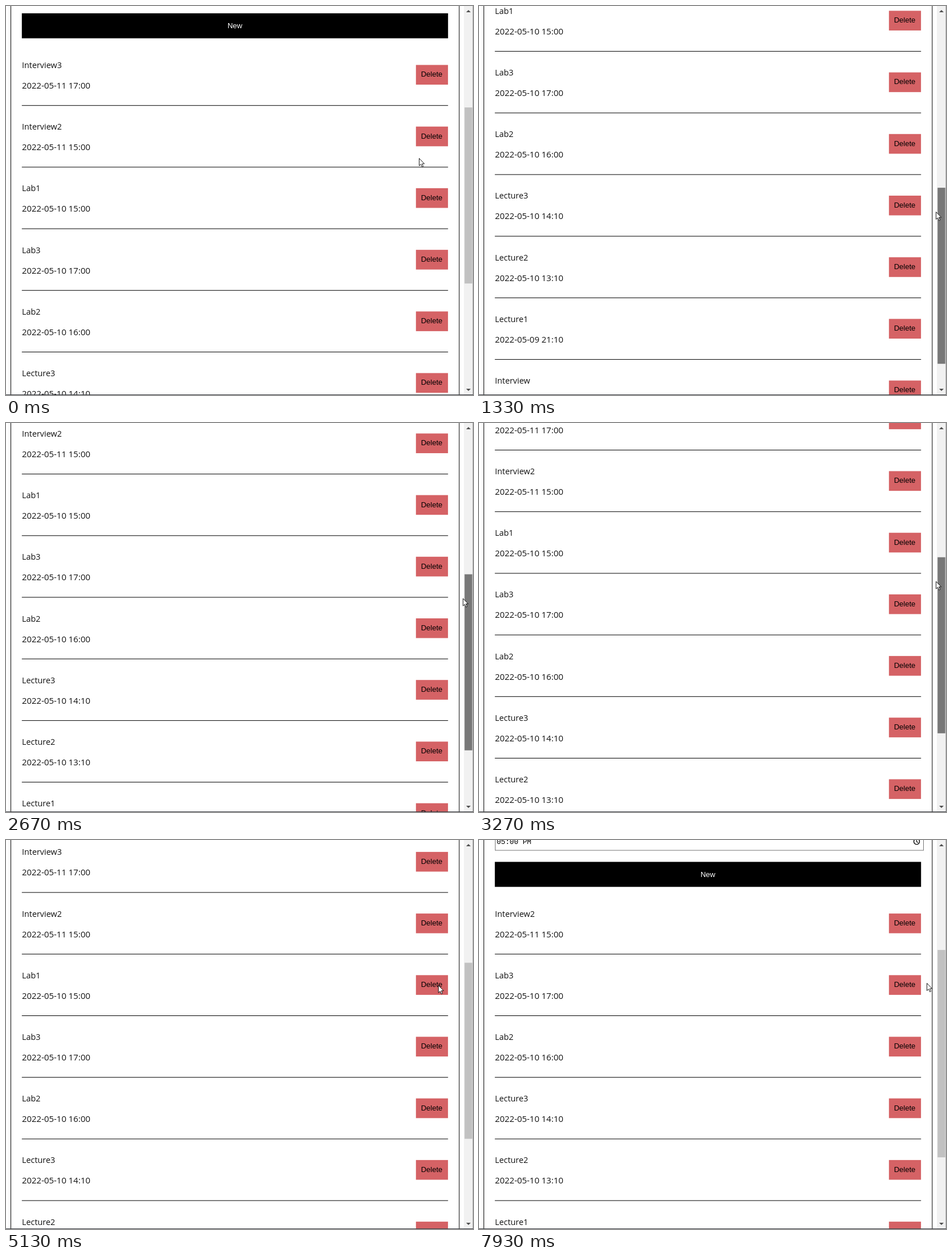
Animation, 820 px wide and 683 px high, one loop 8 s. Source, as an HTML page:

```html
<!DOCTYPE html>
<html lang="en">
<head>
<meta charset="utf-8">
<title>Schedule list</title>
<style>
  html, body { margin: 0; width: 100%; height: 100%; overflow: hidden; background: #fff; }
  svg { display: block; width: 820px; height: 683px; }
  .title, .date { font-family: "Open Sans", "Noto Sans", sans-serif; fill: #111; }
  .title { font-size: 14.4px; }
  .date { font-size: 14.95px; }
  .label { font: 13px "Liberation Sans", Arial, sans-serif; text-anchor: middle; }
  .time { font: 12.7px "Liberation Mono", monospace; white-space: pre; }
</style>
</head>
<body>
<svg id="stage" viewBox="0 0 820 683" xmlns="http://www.w3.org/2000/svg"></svg>
<script>
const W = 820, H = 683, LOOP = 8000, FPS = 15;
const PITCH = 108.2, PAGE = 1434, SCROLL = 356, FIRST = 174.2;
const TRACK = { top: 17, size: 649 };
const GRIP = { x: 802, y: 42 };
const DRAG = { from: 10, to: 72 };
const DELETE_LAB = 85, DELETE_TOP = 106;

const ROWS = [
  { name: "Interview3", date: "2022-05-11 17:00", gone: DELETE_TOP },
  { name: "Interview2", date: "2022-05-11 15:00" },
  { name: "Lab1", date: "2022-05-10 15:00", gone: DELETE_LAB },
  { name: "Lab3", date: "2022-05-10 17:00" },
  { name: "Lab2", date: "2022-05-10 16:00" },
  { name: "Lecture3", date: "2022-05-10 14:10" },
  { name: "Lecture2", date: "2022-05-10 13:10" },
  { name: "Lecture1", date: "2022-05-09 21:10" },
  { name: "Interview", date: "2022-05-09 20:00" }
];

// Strokes of the hand, in steps of 1/15 s. The first drag pulls past the page end.
const DRAGS = [
  { from: 12, to: 25, y: 438 },
  { from: 26, to: 40, y: 193.3 },
  { from: 40, to: 45, y: 150 },
  { from: 47, to: 50, y: 120 },
  { from: 58, to: 61, y: 22 },
  { from: 64, to: 68, y: 82.6 }
];
const REACH = { from: 0, to: 10, x: GRIP.x, y: 220 };
const MOVES = [
  { from: 72, to: 81, x: 745, y: 254 },
  { from: 89, to: 98, x: 742, y: 32 },
  { from: 110, to: 119, x: 786, y: 251 }
];

const stage = document.getElementById("stage");

function add(parent, tag, attrs, text) {
  const el = document.createElementNS("http://www.w3.org/2000/svg", tag);
  for (const key in attrs) el.setAttribute(key, attrs[key]);
  if (text) el.textContent = text;
  parent.appendChild(el);
  return el;
}

const rect = (parent, x, y, width, height, fill) =>
  add(parent, "rect", { x, y, width, height, fill });

const moveTo = (el, x, y) => el.setAttribute("transform", `translate(${x} ${y})`);

const clamp = (v, lo, hi) => Math.min(hi, Math.max(lo, v));

// Follows the strokes one after another, each slowing down towards its end.
function follow(value, strokes, key, step, power) {
  for (const s of strokes) {
    const left = 1 - clamp((step - s.from) / (s.to - s.from), 0, 1);
    value += (s[key] - value) * (1 - left ** power);
    value = key === "y" && strokes === DRAGS ? Math.min(value, PAGE - H - SCROLL) : value;
  }
  return value;
}

rect(stage, 0, 0, W, H, "#fff");
const sides = [8, 795.3].map(x => rect(stage, x, 0, 1, H, "#000"));
const base = rect(stage, 8, 0, 788, 1, "#000");

// form above the list
const form = add(stage, "g");
add(form, "rect", { x: 28.5, y: -40.5, width: 752, height: 33, fill: "#fff", stroke: "#767676" });
add(form, "text", { x: 31, y: -19, class: "time" }, "05:00 PM");
add(form, "circle", { cx: 768.5, cy: -23, r: 5, fill: "none", stroke: "#000", "stroke-width": 1.4 });
add(form, "path", { d: "M768.5 -26.5V-22.5L771 -21", fill: "none", stroke: "#000", "stroke-width": 1.2 });
rect(form, 27.8, 12.8, 748.4, 43.9, "#000");
add(form, "text", { x: 402, y: 39.3, class: "label", fill: "#fff" }, "New");

const rows = ROWS.map(({ name, date, gone = Infinity }) => {
  const box = add(stage, "g");
  add(box, "text", { x: 28, y: -65.2, class: "title" }, name);
  add(box, "text", { x: 28, y: -29.2, class: "date" }, date);
  rect(box, 719.8, -70.7, 56.3, 34.6, "#d56265");
  add(box, "text", { x: 747.5, y: -49.8, class: "label" }, "Delete");
  rect(box, 27.8, 0, 748.4, 1, "#000");
  return { box, gone };
});

// scrollbar
rect(stage, 804, 0, 16, H, "#f1f1f1");
add(stage, "path", { d: "M808 11L812 7L816 11ZM808 672L812 676L816 672Z", fill: "#505050" });
const thumb = rect(stage, 805.2, 0, 13.5, 0, "#c1c1c1");
rect(stage, 819, 0, 1, H, "#bbb");
rect(stage, 0, 682, W, 1, "#3c3f44");

const pointer = add(stage, "path", {
  d: "M.5 .5V13.5L3.5 10.8L5.6 15.6L7.7 14.7L5.6 10H9.6Z",
  fill: "#fff", stroke: "#000", "stroke-width": 0.9
});

function placePointer(step, thumbTop) {
  if (step < DRAG.from) {
    const at = (start, key) => follow(start, [REACH], key, step, 1.75);
    return moveTo(pointer, at(725, "x"), at(267, "y"));
  }
  if (step <= DRAG.to) return moveTo(pointer, GRIP.x, thumbTop + GRIP.y);
  const at = (start, key) => follow(start, MOVES, key, step, 1.75);
  moveTo(pointer, at(GRIP.x, "x"), at(257, "y"));
}

function draw(time) {
  const step = Math.floor((time % LOOP + 5) * FPS / 1000) % (LOOP * FPS / 1000);

  // removing the row at the top keeps the rows below in place
  const offset = follow(0, DRAGS, "y", step, 1.3) - (step >= DELETE_TOP ? PITCH : 0);

  moveTo(form, 0, -offset);
  let y = FIRST - offset;
  let removed = 0;
  for (const { box, gone } of rows) {
    const hidden = step >= gone;
    box.setAttribute("display", hidden ? "none" : "inline");
    moveTo(box, 0, y);
    if (hidden) removed++;
    else y += PITCH;
  }

  const bottom = y - PITCH + 30;
  base.setAttribute("y", bottom);
  for (const side of sides) side.setAttribute("height", Math.min(H, bottom));

  const scale = TRACK.size / (PAGE - PITCH * removed);
  const top = TRACK.top + (SCROLL + offset) * scale;
  const held = step >= DRAG.from && step <= DRAG.to;
  thumb.setAttribute("y", top);
  thumb.setAttribute("height", H * scale);
  thumb.setAttribute("fill", held ? "#787878" : "#c1c1c1");

  placePointer(step, top);
}

const start = performance.now();
function tick() {
  draw(performance.now() - start);
  requestAnimationFrame(tick);
}
tick();
</script>
</body>
</html>
```
